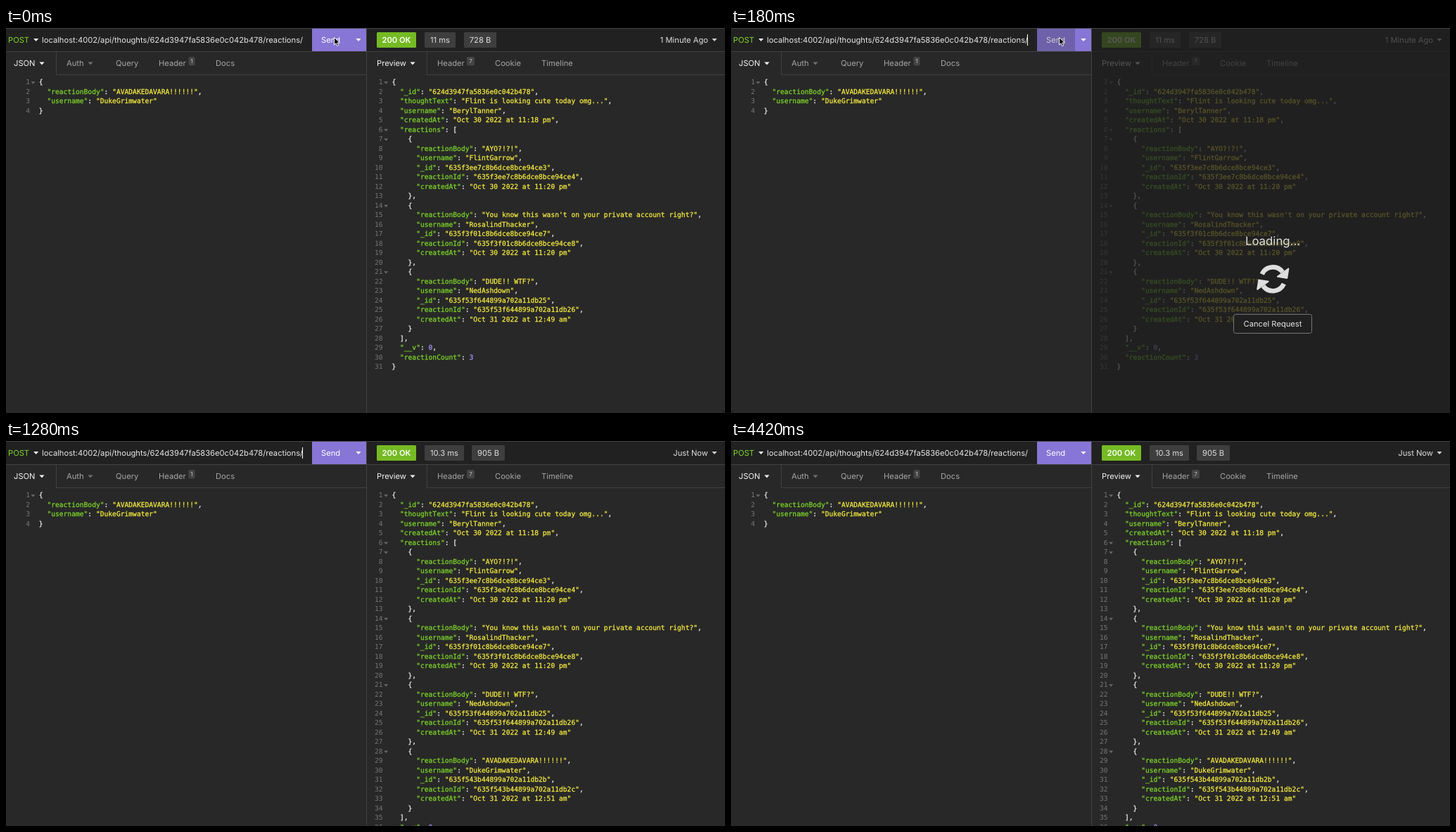
These frames come from a looping animation (1022x548 px, 4.49 s). An HTML page:

```html
<!DOCTYPE html>
<html lang="en">
<head>
<meta charset="utf-8">
<title>API request</title>
<style>
  html, body { margin: 0; width: 100%; height: 100%; overflow: hidden; background: #282828; }
  svg { display: block; }
  text { font: 11.18px Inter, sans-serif; white-space: pre; text-rendering: geometricPrecision; }
  .code text { font: 9.63px "DejaVu Sans Mono", monospace; }
  .code tspan { stroke-width: 0.25px; }
</style>
</head>
<body>
<svg id="stage" width="1022" height="548" viewBox="0 0 1022 548"></svg>
<script>
const LOOP = 4490;
const WHITE = '#f4f4f4', GREY = '#a6a6a6', RULE = '#414141';
const GREEN = '#7ed62b', YELLOW = '#f8ee40', PURPLE = '#a896ff';
const stage = document.getElementById('stage');

function add(parent, tag, attrs = {}, content) {
  const node = document.createElementNS('http://www.w3.org/2000/svg', tag);
  for (const key in attrs) node.setAttribute(key, attrs[key]);
  if (content !== undefined) node.textContent = content;
  return parent.appendChild(node);
}
const group = (parent, attrs) => add(parent, 'g', attrs);
const rect = (parent, x, y, width, height, fill, rx = 0) =>
  add(parent, 'rect', { x, y, width, height, fill, rx });
const label = (parent, x, y, text, fill = WHITE, attrs = {}) =>
  add(parent, 'text', { x, y, fill, ...attrs }, text);
const path = (parent, d, attrs) => add(parent, 'path', { d, ...attrs });
const chevron = (parent, x, y, fill = WHITE, w = 3.6, h = 4) =>
  path(parent, `M${x - w} ${y - h / 2}h${2 * w}l${-w} ${h}z`, { fill });

// JSON listing with line numbers; returns the group of fold arrows
function listing(parent, data, x) {
  const code = group(parent, { class: 'code' });
  const folds = group(code);
  JSON.stringify(data, null, 2).split('\n').forEach((line, i) => {
    const y = 80.3 + i * 13.5;
    label(code, x - 12.8, y, i + 1, '#757575', { 'text-anchor': 'end' });
    if (/[{[]$/.test(line)) chevron(folds, x - 8.3, y - 2.3, '#686868', 3, 3.4);
    const row = label(code, x, y, '');
    for (const [part] of line.matchAll(/"[^"]*"(?=:)|"[^"]*"|\d+|[^"\d]+/g)) {
      const isKey = part[0] === '"' && line.includes(part + ':');
      const fill = isKey ? GREEN : part[0] === '"' ? YELLOW : /\d/.test(part) ? PURPLE : WHITE;
      add(row, 'tspan', { fill, stroke: fill }, part);
    }
  });
  return folds;
}

function tab(x, text, fill = GREY) { label(stage, x, 54.3, text, fill); }
function count(x, w, n) {
  rect(stage, x, 41, w, 12.5, '#444', 2);
  label(stage, x + w / 2, 50.2, n, '#c4c4c4', { 'text-anchor': 'middle', style: 'font-size:8.2px' });
}
function badge(parent, x, w, text) {
  rect(parent, x, 6, w, 22, '#3e3e3e', 1.5);
  label(parent, x + w / 2, 21, text, '#dedede', { 'text-anchor': 'middle' });
}

const thoughtId = '624d3947fa5836e0c042b478';
const reaction = (reactionBody, username, id, last, day, time) => ({
  reactionBody, username,
  _id: id + last[0], reactionId: id + last[1],
  createdAt: `Oct ${day} 2022 at ${time}`
});
const posted = { reactionBody: 'AVADAKEDAVARA!!!!!!', username: 'DukeGrimwater' };
const reactions = [
  reaction('AYO?!?!', 'FlintGarrow', '635f3ee7c8b6dce8bce94ce', '34', 30, '11:20 pm'),
  reaction("You know this wasn't on your private account right?", 'RosalindThacker',
    '635f3f01c8b6dce8bce94ce', '78', 30, '11:20 pm'),
  reaction('DUDE!! WTF?', 'NedAshdown', '635f53f644899a702a11db2', '56', 31, '12:49 am'),
  reaction(posted.reactionBody, posted.username, '635f543b44899a702a11db2', 'bc', 31, '12:51 am')
];
const thought = n => ({
  _id: thoughtId,
  thoughtText: 'Flint is looking cute today omg...',
  username: 'BerylTanner',
  createdAt: 'Oct 30 2022 at 11:18 pm',
  reactions: reactions.slice(0, n),
  __v: 0,
  reactionCount: n
});

// Panels and rules
rect(stage, 0, 0, 1022, 548, '#282828');
rect(stage, 0, 0, 1022, 33, '#212121');
for (const [x, y, w, h] of [
  [0, 0, 1022, 1], [0, 33, 1022, 1], [71, 66, 441, 1], [598, 66, 424, 1],
  [71, 34, 1, 33], [598, 34, 1, 33], [512, 0, 1, 548]
]) rect(stage, x, y, w, h, RULE);

// Request side
label(stage, 3, 21, 'POST', GREEN);
chevron(stage, 42.7, 17);
label(stage, 51, 21, `localhost:4002/api/thoughts/${thoughtId}/reactions/`, '#e6e6e6');
const caret = rect(stage, 421, 9, 1, 16, '#fff');
const send = group(stage);
rect(send, 435, 1, 54.5, 32, '#8776d5');
label(send, 448, 21, 'Send', '#fff');
rect(stage, 489, 1, 23, 32, '#8776d5');
chevron(stage, 501, 17, '#fff');
tab(11, 'JSON', WHITE);
chevron(stage, 51, 50.5);
tab(86, 'Auth');
chevron(stage, 120, 50.5, '#707070');
tab(156, 'Query');
tab(217, 'Header');
count(259.5, 9, 1);
tab(298, 'Docs');
listing(stage, posted, 46.8);

// Response side
rect(stage, 527, 6, 56, 22, '#75ba24', 1.5);
label(stage, 555, 21, '200 OK', '#fff', { 'text-anchor': 'middle', style: 'font-weight:600' });
chevron(stage, 1007, 17, '#d0d0d0');
tab(527, 'Preview', WHITE);
chevron(stage, 578, 50.5);
tab(613, 'Header');
count(655, 11, 7);
tab(695, 'Cookie');
tab(761, 'Timeline');

function response(n, time, timeWidth, size, sizeX, sizeWidth, age) {
  const view = group(stage);
  badge(view, 595, timeWidth, time);
  badge(view, sizeX, sizeWidth, size);
  label(view, 998, 21, age, '#dedede', { 'text-anchor': 'end' });
  return { view, folds: listing(view, thought(n), 548.4) };
}
const before = response(3, '11 ms', 44, '728 B', 651, 46, '1 Minute Ago');
const after = response(4, '10.3 ms', 56, '905 B', 662, 47, 'Just Now');

// Loading overlay
const overlay = group(stage);
rect(overlay, 513, 1, 509, 547, '#1e1e1e').setAttribute('opacity', 0.74);
label(overlay, 770, 309, 'Loading...', '#dedede', { 'text-anchor': 'middle', style: 'font-size:16.8px' });
const spinner = group(overlay);
for (const turn of [0, 180]) {
  const half = group(spinner, { transform: `rotate(${turn})` });
  path(half, 'M-16.4 -4.4A17 17 0 0 1 12 -12', { fill: 'none', stroke: '#dedede', 'stroke-width': 6.6 });
  path(half, 'M19.5 -18V-4.5H6z', {
    fill: '#dedede', stroke: '#dedede', 'stroke-width': 2, 'stroke-linejoin': 'round'
  });
}
add(overlay, 'rect', { x: 714.5, y: 407.5, width: 111, height: 27, rx: 3, fill: '#202020', stroke: '#777' });
label(overlay, 770, 425.2, 'Cancel Request', '#e4e4e4', { 'text-anchor': 'middle' });

// Pointers
const arrow = group(stage);
path(arrow, 'M0 0V10.5L2.5 8.2L4.3 12.2L6.2 11.3L4.5 7.5H8z', {
  fill: '#000', stroke: '#fff', 'stroke-width': 1, 'stroke-linejoin': 'round'
});
const beam = group(stage);
for (const [stroke, width] of [['#e8e8e8', 2.8], ['#111', 1]]) {
  path(beam, 'M-3 -6Q0 -6 0 -4V4Q0 6 -3 6M3 -6Q0 -6 0 -4V4Q0 6 3 6M-2 1.5H2', {
    fill: 'none', stroke, 'stroke-width': width, 'stroke-linecap': 'round'
  });
}

const blinks = [60, 620, 1110, 1670, 2170, 2710, 3240, 3750, 4320, 4420];
// time, x, y of each pointer position
const moves = [
  [0, 466.5, 13.5], [620, 480, 46], [680, 538, 160], [740, 588, 275], [790, 608.5, 331],
  [850, 613, 338], [1080, 616, 350], [1110, 624, 382], [1140, 637, 425], [1180, 652, 470],
  [1210, 666, 510], [1250, 678, 541], [1280, 700, 600]
];
const show = (node, on) => node.setAttribute('visibility', on ? 'inherit' : 'hidden');
const place = (node, x, y, extra = '') => node.setAttribute('transform', `translate(${x} ${y})${extra}`);

function draw(t) {
  show(caret, blinks.filter(b => b <= t).length % 2);
  send.setAttribute('opacity', t >= 60 && t < 620 ? 0.76 : 1);
  show(before.view, t < 230);
  show(after.view, t >= 230);
  show(after.folds, t >= 680);

  show(overlay, t >= 60 && t < 230);
  overlay.setAttribute('opacity', t < 120 ? 0.45 : 1);
  place(spinner, 770.3, 357.3, ` rotate(${t < 170 ? 0 : 9})`);

  const [, x, y] = moves.findLast(m => m[0] <= t);
  const overText = x > 512;
  show(arrow, !overText);
  show(beam, overText);
  place(overText ? beam : arrow, x, y);
}

const start = performance.now();
function tick() {
  draw((performance.now() - start) % LOOP);
  requestAnimationFrame(tick);
}
tick();
</script>
</body>
</html>
```
